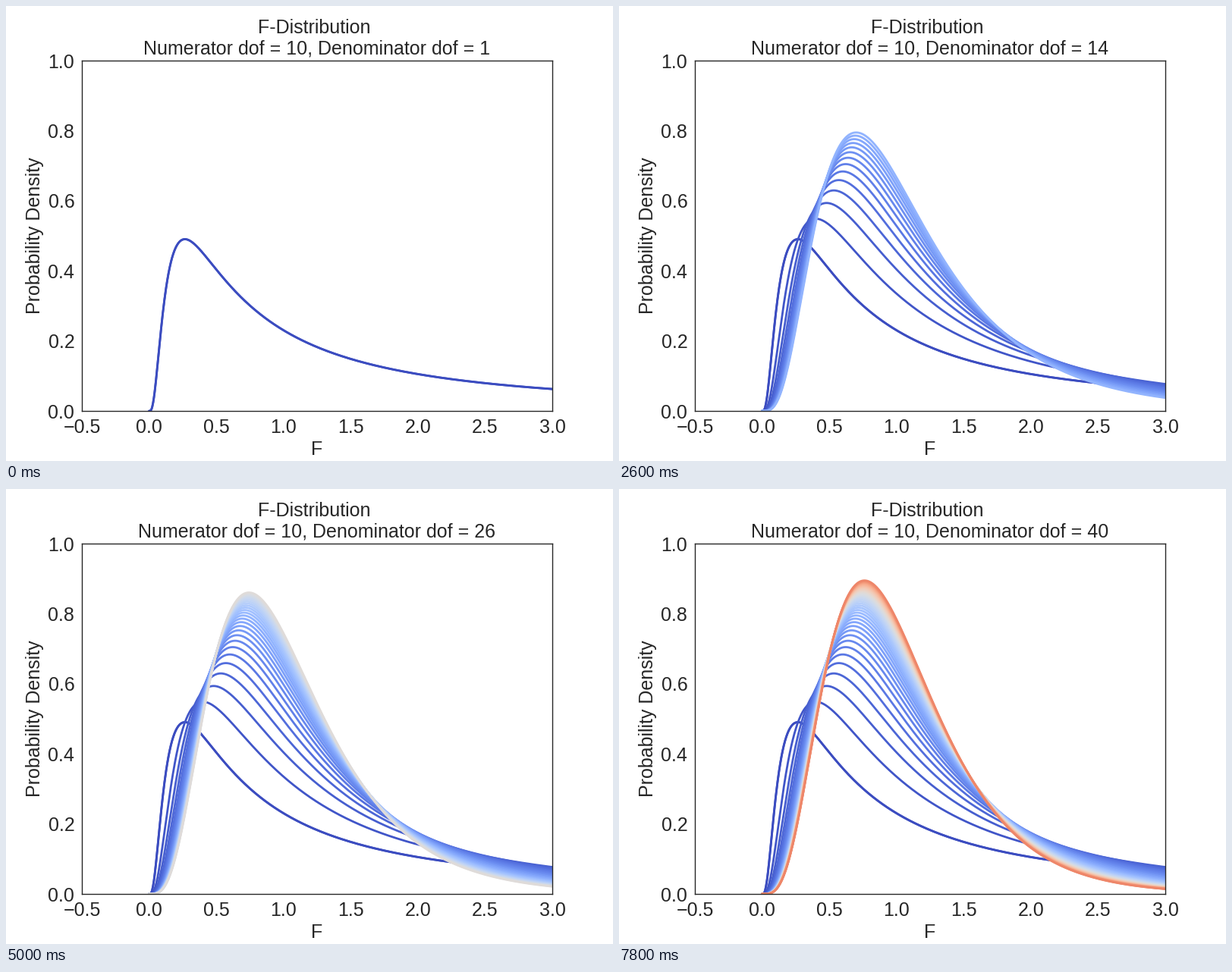
Recreate the animation shown at these times as a matplotlib script. Size 800x600 px, loop 8 s.

```python
import math

import numpy as np
import matplotlib.pyplot as plt
from matplotlib.animation import FuncAnimation

NUM_DOF = 10
FRAMES = 40
COLOR_STEPS = 49
INK = "0.15"

plt.rcParams.update({
    "font.family": "Liberation Sans",
    "font.size": 18,
    "axes.titlesize": 18,
    "axes.labelsize": 18,
    "axes.linewidth": 1,
    "axes.edgecolor": INK,
    "axes.labelcolor": INK,
    "text.color": INK,
    "xtick.color": INK,
    "ytick.color": INK,
    "xtick.major.size": 0,
    "ytick.major.size": 0,
    "xtick.major.pad": 7,
    "ytick.major.pad": 7,
    "lines.solid_capstyle": "round",
})


def f_pdf(x, m, n):
    """Density of the F-distribution with m and n degrees of freedom."""
    log_beta = math.lgamma(m / 2) + math.lgamma(n / 2) - math.lgamma((m + n) / 2)
    scale = math.exp(m / 2 * math.log(m / n) - log_beta)
    return scale * x ** (m / 2 - 1) * (1 + m * x / n) ** (-(m + n) / 2)


fig, ax = plt.subplots(figsize=(8, 6), dpi=100, facecolor="white")
ax.set_xlim(-0.5, 3)
ax.set_ylim(0, 1)
ax.set_xlabel("F")
ax.set_ylabel("Probability Density")
title = ax.set_title("")

x = np.linspace(0, 3, 1000)


def add_curve(dof):
    color = plt.cm.coolwarm((dof - 1) / COLOR_STEPS)
    return ax.plot(x, f_pdf(x, NUM_DOF, dof), color=color, lw=2)[0]


add_curve(1)  # the first curve is drawn twice, which firms up its edges
curves = [add_curve(dof) for dof in range(1, FRAMES + 1)]


def update(frame):
    for i, curve in enumerate(curves):
        curve.set_visible(i <= frame)
    title.set_text("F-Distribution \nNumerator dof = %d, Denominator dof = %d"
                   % (NUM_DOF, frame + 1))
    return curves + [title]


anim = FuncAnimation(fig, update, frames=FRAMES, interval=200,
                     repeat=True, repeat_delay=0)
plt.show()
```
